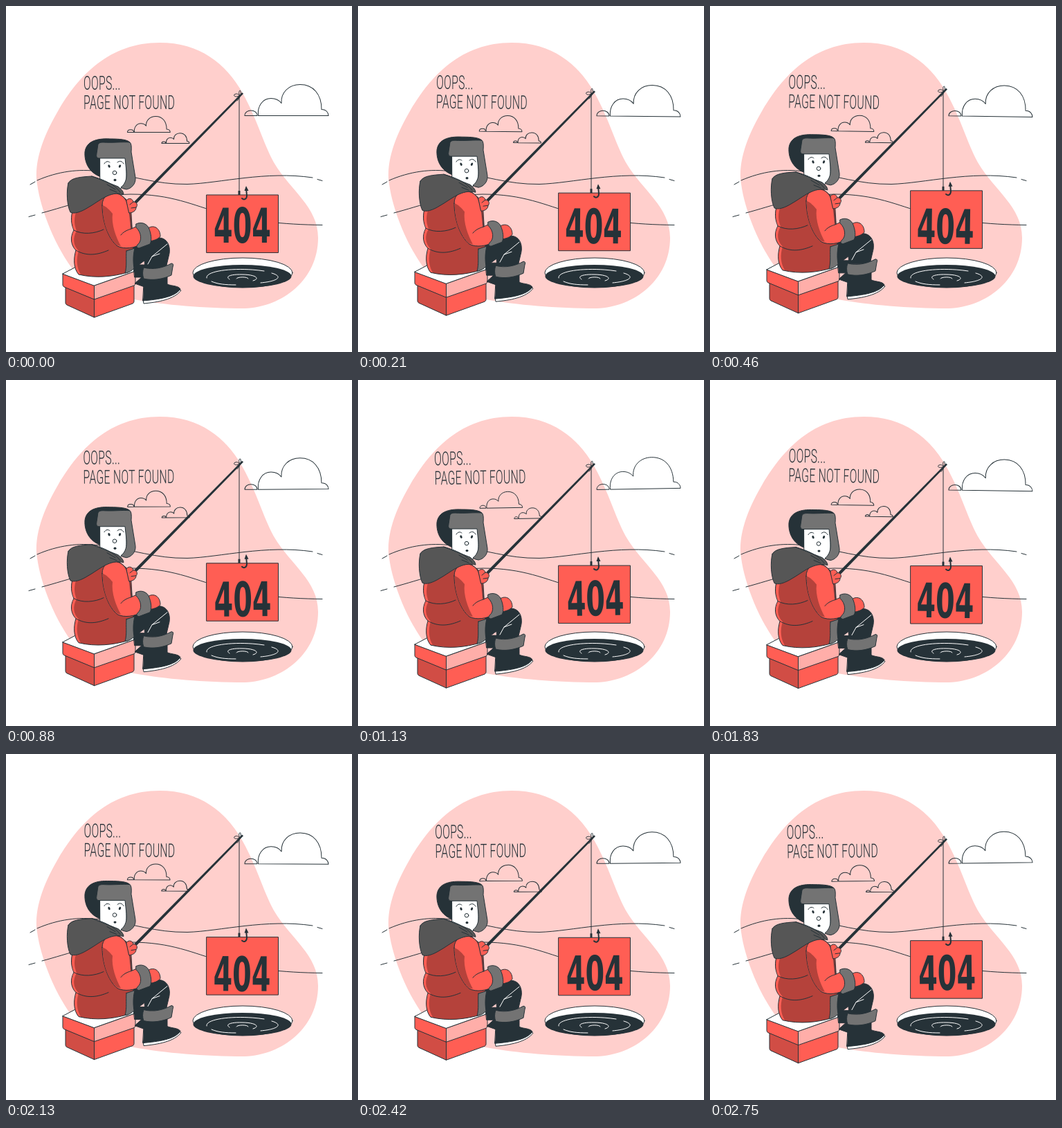
Animation of 500 by 500 pixels, one loop 2790 ms. Source, as an HTML page:

```html
<!DOCTYPE html>
<html lang="en">
<head>
<meta charset="utf-8">
<title>Page not found</title>
<style>
  html, body { margin: 0; height: 100%; overflow: hidden; background: #fff; }
  svg { display: block; width: 100%; height: 100%; }
  svg * { vector-effect: non-scaling-stroke; }
  .line { fill: none; }
  .line, .ink { stroke: #263238; stroke-linecap: round; stroke-linejoin: round; }
  .crease { fill: none; stroke: #fff; stroke-linecap: round; }
  .white { fill: #fff; }
  .dark { fill: #263238; }
  .red { fill: #ff5e54; }
  .side { fill: #d14d45; }
  .shade { fill: #b5423b; }
  .pink { fill: #ffaea9; }
  .pale { fill: #ffcfcc; }
  .fur { fill: #737373; }
  .hood { fill: #565656; }
  .title { font: 300 27.5px Roboto, sans-serif; letter-spacing: .45px; fill: #263238; }
  .code { font: 700 69px "DejaVu Sans", sans-serif; fill: #263238; text-anchor: middle; }
</style>
</head>
<body>
<svg viewBox="0 0 500 500">
  <defs>
    <g id="cloud">
      <path class="line" d="M0 0C0-10 18-10 18 0Z"/>
      <path class="ink" d="M19.500 0C18-14 26-25 38-25C45-25 50-22 53-18C52-34 64-45 80-45C99-45 111-31 111-9C118-9 121-4 121 0Z"/>
    </g>
  </defs>

  <path class="pale" d="M222 53C150 53 105 100 75 152C54 188 40 225 45 257C50 295 72 350 100 385C125 410 155 418 185 424C230 432 285 437 345 437C400 435 451 395 451 335C451 290 412 268 387 226C370 194 364 166 342 126C318 83 280 53 222 53Z"/>

  <g class="line">
    <path d="M35 258L42 254M45 252C75 239 105 235 135 239C185 245 215 258 262 257.500C310 256 375 238 443 248M450 250.500L457 252.500"/>
    <path d="M33 304.500L42 302M52 299C90 289 130 273 180 272C240 272 270 288 310 299C350 310 400 316 457 316.500"/>
  </g>

  <g id="hole">
    <ellipse class="ink white" cx="342" cy="385.500" rx="72" ry="21.500"/>
    <ellipse class="dark" cx="341.500" cy="390.500" rx="71" ry="16.500"/>
    <path class="crease" d="M290 393C287 382 335 377 373 383M384 386C402 391 392 398 368 400M297 398C306 402 317 403 332 403"/>
    <path class="crease" d="M323 395C315 390 328 387.500 341 388C361 388 368 394 357 397M333 394C334 391 350 391 350 394"/>
  </g>

  <g id="clouds">
    <use href="#cloud" transform="translate(345 158.500)" fill="#fff"/>
    <use href="#cloud" transform="translate(175.500 182.500) scale(.51)" fill="#ffcfcc"/>
    <use href="#cloud" transform="translate(225 198.500) scale(.33)" fill="#ffcfcc"/>
  </g>

  <g id="angler">
    <g id="sign">
      <rect class="ink red" x="290" y="273" width="103.500" height="83.500"/>
      <path class="line" d="M337 129V268"/>
      <path class="dark" d="M335.500 267H338.500V273H335.500Z"/>
      <path class="line" stroke-width="2" d="M347 263L348 274C348 279 344 281 341 278"/>
      <path class="dark" d="M347 260L350.500 267H344.500Z"/>
    </g>

    <g id="box">
      <path class="ink red" d="M127.500 418L185 400V427Q185 429 183 430L127.500 450Z"/>
      <path class="ink side" d="M127.500 418V450L88 432Q86 431 86 429V402Z"/>
      <path class="ink pink" d="M127.500 404L187 383V401Q187 403 185 404L127.500 424Z"/>
      <path class="ink red" d="M127.500 404V424L84 406Q82 405 82 403V387Z"/>
      <path class="ink white" d="M82 387L103 376H185L187 383L127.500 404Z"/>
    </g>

    <g id="legs">
      <path class="ink dark" d="M184 374H203V407L186 401L196 392H186Z"/>
      <path class="ink dark" d="M172 350C188 341 205 336 222 335C234 336 239 349 235 362L231 379H201L200 368L184 380Z"/>
      <path class="crease" d="M205 373L211 362L233 344M211 362L222 358"/>
      <path class="ink white" d="M198 424L199 430C220 428 243 424 253 411L247 408Z"/>
      <path class="ink dark" d="M200 390H233V402C240 405 249 404 252 409C244 421 220 424 198 426Z"/>
      <path class="ink fur" d="M199 378C213 382 228 378 239 372Q243 372 241 377L239 389C226 395 212 397 199 394Q196 386 199 378Z"/>
    </g>

    <g id="coat">
      <path class="ink red" d="M207 320C216 316 223 323 223 333C218 339 210 339 204 341Z"/>
      <path class="ink shade" d="M97 293C93 305 94 315 98 324C92 335 94 346 101 353C97 366 98 380 105 388C130 394 155 391 176 385L184 350L180 285L160 268Z"/>
      <path class="red" d="M97.500 294C94 306 95 316 98.500 324C92.500 335 95 346 101.500 353C98 366 99 380 105 387L108 388C102 378 101 366 105 354C97 346 96 335 102 325C98 315 98 306 102 295Z"/>
      <path class="line" d="M98 324C111 331 128 329 141 323M101 353C116 362 132 360 148 353"/>
      <path class="ink fur" d="M174 354L186 350C183 362 184 373 185 379Q180 385 172 386C175 376 173 364 174 354Z"/>
      <path class="ink red" d="M139 288C139 275 148 270 160 271C174 274 177 288 179 302L181 322L192 317L198 343C186 350 171 352 161 347C147 336 139 310 139 288Z"/>
      <path class="shade" d="M140 288C139 310 147 335 161 346L166 347C159 334 152 316 154 300C150 295 145 290 140 288Z"/>
      <path class="line" d="M181 322C174 324 169 327 166 331"/>
      <path class="ink fur" d="M188 315C196 311 203 315 206 320C210 329 211 339 208 344L192 350Q187 349 190 345C197 340 196 327 188 320Z"/>
    </g>

    <g id="head">
      <path class="ink dark" d="M137 247C120 241 113 226 114 211C116 196 130 191 150 192C165 192 175 193 179 197L172 212H138Z"/>
      <path class="ink white" d="M136 219H174V250C173 260 168 264 160 265C150 264 142 259 136 251Z"/>
      <path class="ink hood" d="M90 256C94 248 108 247 124 246L162 261Q170 267 170 272C150 267 135 282 119 291C108 298 98 301 93 298C88 288 87 268 90 256Z"/>
      <path class="line" d="M124 246C142 251 157 258 165 269M146 258L158 265M150 265L160 269"/>
      <path class="ink fur" d="M133 200Q134 197 140 197C155 198 168 196 179 197Q182 199 181 211L187 248C188 257 181 264 174 265Q168 264 166 262C173 257 175 248 174 239L172 220H136Q129 221 131 213Z"/>
      <path class="line" d="M142 228C144 224 148 224 150 226M161 226C164 223 168 224 170 228"/>
      <ellipse class="dark" cx="149" cy="231.500" rx="1.500" ry="2.300" transform="rotate(-25 149 231.500)"/>
      <ellipse class="dark" cx="164.500" cy="231.500" rx="1.500" ry="2.300" transform="rotate(25 164.500 231.500)"/>
      <circle class="line" cx="157" cy="241" r="2.800"/>
      <ellipse class="dark" cx="157.500" cy="251.500" rx="2" ry="1.700"/>
    </g>

    <g id="rod">
      <path class="dark" d="M185.500 282.500L341.200 125L343 126.700L188.500 285.500Z"/>
      <path class="line" d="M338 129C333 133 328 130 330 128C333 126 336 127 338 130C335 125 338 120 339 123C340 127 339 131 334 137"/>
      <path class="ink red" d="M174 281C178 276 183 279 184 283C189 283 191 288 188 291C188 296 183 299 178 299Z"/>
      <path class="line" d="M184 283L179 287M188 291L181 292"/>
    </g>
  </g>

  <g id="words">
    <g transform="translate(112 121) scale(.575 1)">
      <text class="title">OOPS...</text>
      <text class="title" y="28">PAGE NOT FOUND</text>
    </g>
    <g transform="translate(341.500 342) scale(.575 1)">
      <text class="code">404</text>
    </g>
  </g>
</svg>
<script>
  const LOOP = 2790, CYCLE = 1500, RISE = 10;
  const [angler, words, clouds] = ['angler', 'words', 'clouds'].map(id => document.getElementById(id));
  const move = (part, transform) => part.setAttribute('transform', transform);

  // Linear swing in degrees: 0, 1 at a quarter, -1 at three quarters, 0.
  const swing = p => p < .25 ? 4 * p : p < .75 ? 2 - 4 * p : 4 * p - 4;

  function draw(now) {
    const phase = now % LOOP / CYCLE % 1;
    const lift = RISE * (1 - Math.abs(1 - 2 * phase));
    const angle = swing(phase);
    move(angler, `translate(0 ${-lift})`);
    move(words, `rotate(${angle} 247 222)`);
    move(clouds, `rotate(${angle} 320 156)`);
  }

  const start = performance.now();
  function tick() {
    draw(performance.now() - start);
    requestAnimationFrame(tick);
  }
  tick();
</script>
</body>
</html>
```
